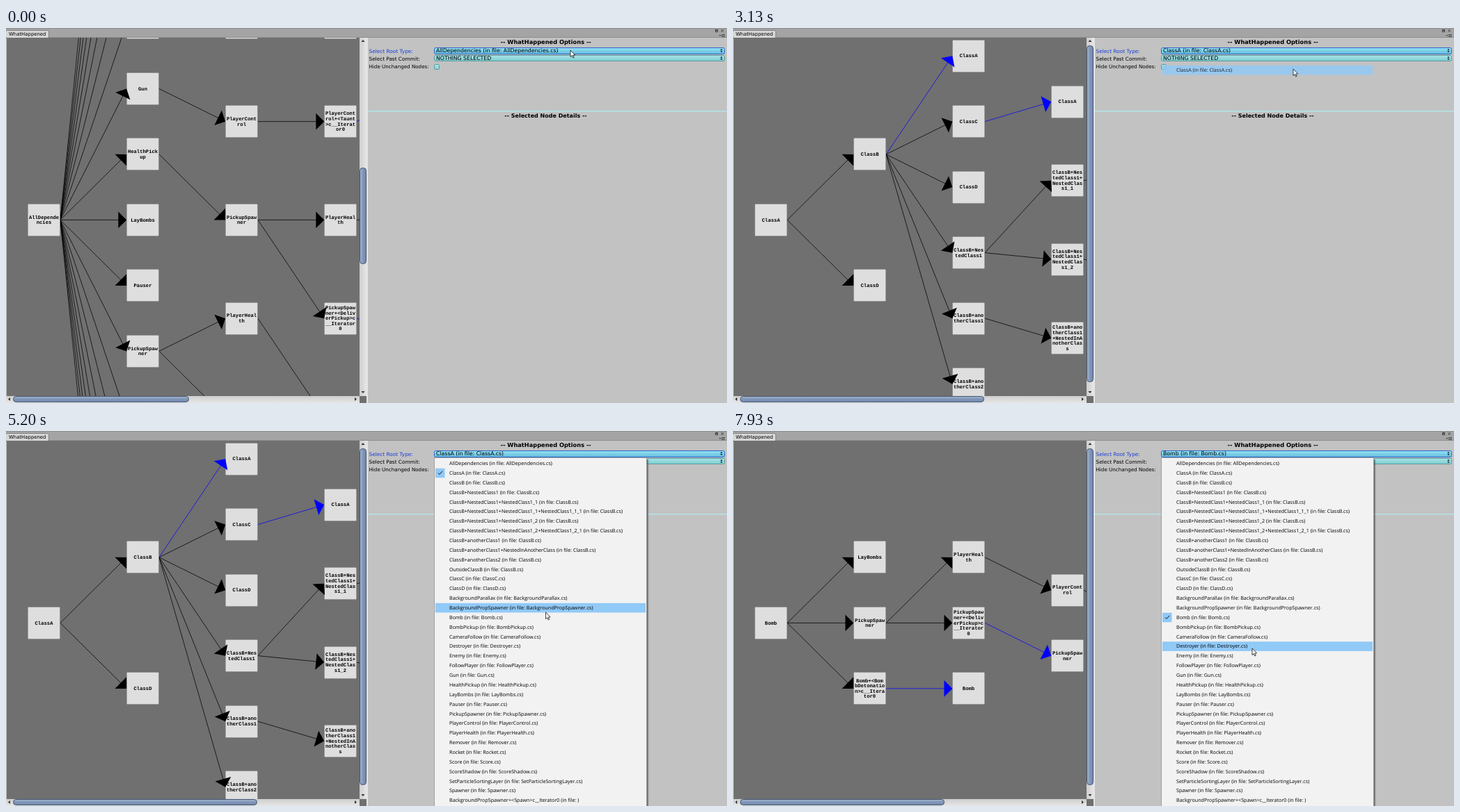
Write an HTML page with a canvas that moves like this. It is 1036x540 px and loops after 8000 ms.

```html
<!DOCTYPE html>
<html lang="en">
<head>
<meta charset="utf-8">
<title>WhatHappened</title>
<style>
html, body { margin: 0; width: 100%; height: 100%; overflow: hidden; background: #c2c2c2; }
canvas { display: block; }
</style>
</head>
<body>
<canvas id="stage" width="1036" height="540"></canvas>
<script>
const ctx = document.getElementById('stage').getContext('2d');
const UI = '"DejaVu Sans", sans-serif';
const MENU = '"Open Sans", "Noto Sans", sans-serif';
const MONO = '"Liberation Mono", monospace';
const LOOP = 8000, STEP = 200 / 3;
const ROW = 13.863, ROW0 = 46.6;

// node: column, row, label, parent index, back reference
const fan = [];
for (let r = 3; r <= 10; r++) fan.push([1, -r, '', 0], [1, r, '', 0]);
const graphs = [
  { title: 'AllDependencies', thumbY: [201, 340], thumbX: 263, nodes: [
    [0, 0, 'AllDependencies', -1],
    [1, -2, 'Gun', 0],
    [1, -1, 'HealthPickup', 0],
    [1, 0, 'LayBombs', 0],
    [1, 1, 'Pauser', 0],
    [1, 2, 'PickupSpawner', 0],
    [2, -1.5, 'PlayerControl', 1],
    [2, 0, 'PickupSpawner', 2],
    [2, 1.5, 'PlayerHealth', 5],
    [3, -1.5, 'PlayerControl+<Taunt>c__Iterator0', 6],
    [3, 0, 'PlayerHealth', 7],
    [3, 1.5, 'PickupSpawner+<DeliverPickup>c__Iterator0', 7],
    [2, 3, '', 5], [3, 3, '', 8],
    [4, -2, '', 9, 1], [4, 0, '', 10], [4, 1.75, '', 11, 1],
    [2, -3, '', -1], [3, -3, '', -1],
    ...fan
  ] },
  { title: 'ClassA', thumbY: [25, 510], thumbX: 361, nodes: [
    [0, 0, 'ClassA', -1],
    [1, -1, 'ClassB', 0],
    [1, 1, 'ClassD', 0],
    [2, -2.5, 'ClassA', 1, 1],
    [2, -1.5, 'ClassC', 1],
    [2, -0.5, 'ClassD', 1],
    [2, 0.5, 'ClassB+NestedClass1', 1],
    [2, 1.5, 'ClassB+anotherClass1', 1],
    [2, 2.5, 'ClassB+anotherClass2', 1],
    [3, -1.8, 'ClassA', 4, 1],
    [3, -0.6, 'ClassB+NestedClass1+NestedClass1_1', 6],
    [3, 0.6, 'ClassB+NestedClass1+NestedClass1_2', 6],
    [3, 1.8, 'ClassB+anotherClass1+NestedInAnotherClass', 7],
    [4, -0.8, '', 10], [4, 0.8, '', 11]
  ] },
  { title: 'Bomb', thumbY: [25, 510], thumbX: 304, nodes: [
    [0, 0, 'Bomb', -1],
    [1, -1, 'LayBombs', 0],
    [1, 0, 'PickupSpawner', 0],
    [1, 1, 'Bomb+<Bom|bDetonation>c__Iterator0', 0],
    [2, -1, 'PlayerHealth', 2],
    [2, 0, 'PickupSpawner+<DeliverPickup>c__Iterator0', 2],
    [2, 1, 'Bomb', 3, 1],
    [3, -0.5, 'PlayerControl', 4],
    [3, 0.5, 'PickupSpawner', 5, 1],
    [4, 0, '', 7]
  ] }
];

const inFile = (type, file = type) => `${type} (in file: ${file}.cs)`;
const inB = type => inFile(type, 'ClassB');
const items = [
  ...['AllDependencies', 'ClassA', 'ClassB'].map(s => inFile(s)),
  ...['ClassB+NestedClass1', 'ClassB+NestedClass1+NestedClass1_1',
    'ClassB+NestedClass1+NestedClass1_1+NestedClass1_1_1',
    'ClassB+NestedClass1+NestedClass1_2',
    'ClassB+NestedClass1+NestedClass1_2+NestedClass1_2_1',
    'ClassB+anotherClass1', 'ClassB+anotherClass1+NestedInAnotherClass',
    'ClassB+anotherClass2', 'OutsideClassB'].map(inB),
  ...('ClassC ClassD BackgroundParallax BackgroundPropSpawner Bomb BombPickup CameraFollow ' +
    'Destroyer Enemy FollowPlayer Gun HealthPickup LayBombs Pauser PickupSpawner PlayerControl ' +
    'PlayerHealth Remover Rocket Score ScoreShadow SetParticleSortingLayer Spawner')
    .split(' ').map(s => inFile(s)),
  'BackgroundPropSpawner+<Spawn>c__Iterator0 (in file: )'
];

// times below are in steps of 1/15 s
const menus = [[22, 46, 0], [65, 89, 1], [110, 120, 16]];   // open, close, checked row
const picks = [[46, 1], [88, 16]];                          // start of fade, row
const path = [                                              // step, x, y of the pointer
  [0, 811, 32], [15, 811, 32], [16, 810.5, 32], [27, 810.5, 32], [30, 808, 47], [33, 805, 59],
  [47, 805, 59], [52, 803, 29], [54, 803, 29], [56, 803, 32], [57, 803, 32], [58, 802.5, 32.5],
  [66, 802.5, 32.5], [67, 802, 42], [71, 794, 138], [75, 781, 230], [77, 776, 255], [79, 775, 267],
  [89, 775, 267], [92, 774, 240], [97, 771, 90], [101, 770, 36], [105, 773, 32],
  [114, 773, 32], [115, 771, 42], [117, 760, 165], [119, 746, 313], [120, 746, 313]
];

function pointerAt(n) {
  const i = path.findIndex(k => k[0] > n);
  const [a, x, y] = path[i - 1], [b, x2, y2] = path[i];
  const u = (n - a) / (b - a);
  return [x + (x2 - x) * u, y + (y2 - y) * u];
}

function box(x, y, w, h, fill, stroke) {
  ctx.fillStyle = fill;
  ctx.fillRect(x, y, w, h);
  if (stroke) {
    ctx.strokeStyle = stroke;
    ctx.lineWidth = 1;
    ctx.strokeRect(x + 0.5, y + 0.5, w - 1, h - 1);
  }
}

function pill(x, y, w, h, r, fill, stroke) {
  ctx.beginPath();
  ctx.roundRect(x + 0.5, y + 0.5, w - 1, h - 1, r);
  ctx.fillStyle = fill;
  ctx.fill();
  ctx.strokeStyle = stroke;
  ctx.lineWidth = 1;
  ctx.stroke();
}

function poly(points, fill) {
  ctx.beginPath();
  points.forEach(p => ctx.lineTo(p[0], p[1]));
  ctx.closePath();
  ctx.fillStyle = fill;
  ctx.fill();
}

function text(s, x, y, font, color = '#000', align = 'left') {
  ctx.font = font;
  ctx.fillStyle = color;
  ctx.textAlign = align;
  ctx.fillText(s, x, y);
}

function ramp(x, y, x2, y2, ...colors) {
  const g = ctx.createLinearGradient(x, y, x2, y2);
  colors.forEach((c, i) => g.addColorStop(i / (colors.length - 1), c));
  return g;
}

function drawGraph(g) {
  const at = node => [54.5 + 142 * node[0], 276.4 + 94.5 * node[1]];
  const color = node => node[4] ? '#00f' : '#000';
  const links = g.nodes.filter(node => node[3] >= 0).map(node => {
    const [ax, ay] = at(g.nodes[node[3]]), [bx, by] = at(node);
    return [ax + 23.5, ay, bx - 23.3, by, color(node)];
  });
  ctx.save();
  ctx.beginPath();
  ctx.rect(1, 14, 507, 516);
  ctx.clip();
  box(0, 14, 508, 516, '#707070');
  ctx.lineWidth = 0.75;
  for (const [ax, ay, bx, by, c] of links) {
    ctx.strokeStyle = c;
    ctx.beginPath();
    ctx.moveTo(ax, ay);
    ctx.lineTo(bx, by);
    ctx.stroke();
  }
  for (const node of g.nodes) {
    const [x, y] = at(node);
    const left = Math.round(x - 23.5), top = Math.round(y - 23.5);
    box(left, top, 47, 47, '#555');
    box(left + 0.5, top + 0.5, 46, 46, '#dedede');
  }
  for (const [ax, ay, bx, by, c] of links) {
    const d = Math.hypot(bx - ax, by - ay);
    const u = 11.8 * (bx - ax) / d, v = 11.8 * (by - ay) / d;
    poly([[bx, by], [bx - u - v, by - v + u], [bx - u + v, by - v - u]], c);
  }
  for (const node of g.nodes) {
    if (!node[2]) continue;
    const [x, y] = at(node);
    const lines = node[2].split('|').flatMap(s => s.match(/.{1,10}/g));
    lines.forEach((s, i) =>
      text(s, x, y + 2.1 + 7.6 * (i - (lines.length - 1) / 2), `bold 7.2px ${MONO}`, '#000', 'center'));
  }
  ctx.restore();
}

function drawScrollbars(g) {
  const blues = ['#a9b9d3', '#8095b8', '#6f86ab'], edge = '#46566f';
  box(508, 14, 10, 516, ramp(508, 0, 518, 0, '#cecece', '#e6e6e6'));
  box(0, 530, 508, 10, ramp(0, 530, 0, 540, '#cecece', '#e6e6e6'));
  box(508, 530, 10, 10, '#707070');
  const [top, end] = g.thumbY;
  pill(508, top, 10, end - top, 4, ramp(508, 0, 518, 0, ...blues), edge);
  pill(10, 530, g.thumbX - 10, 9, 4, ramp(0, 530, 0, 539, ...blues), edge);
  poly([[513, 17], [515.5, 20], [510.5, 20]], '#333');
  poly([[513, 526], [515.5, 523], [510.5, 523]], '#333');
  poly([[3, 534.5], [6, 532], [6, 537]], '#333');
  poly([[504, 534.5], [501, 532], [501, 537]], '#333');
  box(518, 14, 2, 526, '#e4e4e4');
}

function drawPopup(y, label, focused) {
  const fill = focused ? ramp(0, y, 0, y + 10, '#9be4f4', '#7acfe8', '#62b8dc')
    : ramp(0, y, 0, y + 9, '#b2eaec', '#90d8db', '#7ccbcf');
  pill(615, y, 418, focused ? 10 : 9, 2, fill, focused ? '#2c66c4' : '#5c999d');
  text(label, 618, y + 7.4, `7.78px ${UI}`);
  const m = y + 4.5;
  poly([[1028, m - 2.7], [1029.6, m - 0.5], [1026.4, m - 0.5]], '#123');
  poly([[1028, m + 2.7], [1029.6, m + 0.5], [1026.4, m + 0.5]], '#123');
}

function drawPanel(g) {
  box(520, 14, 516, 526, '#c2c2c2');
  text('-- WhatHappened Options --', 775.7, 23.3, `bold 8.25px ${UI}`, '#000', 'center');
  text('Select Root Type:', 521.5, 35.6, `7.35px ${UI}`, '#1a3fd8');
  text('Select Past Commit:', 521.5, 46.8, `7.3px ${UI}`);
  text('Hide Unchanged Nodes:', 521.5, 58.3, `7.15px ${UI}`);
  drawPopup(28, inFile(g.title), true);
  drawPopup(39, 'NOTHING SELECTED', false);
  pill(615, 52, 8, 8, 1, ramp(0, 52, 0, 60, '#b2eaec', '#86cdd1'), '#5c999d');
  box(520, 119, 516, 1.5, '#b4e6e8');
  text('-- Selected Node Details --', 775.5, 128.7, `bold 8px ${UI}`, '#000', 'center');
}

function drawFrame() {
  box(0, 0, 1036, 14, '#a4a4a4');
  box(0, 0, 1036, 1, '#8c8c8c');
  box(0, 13, 1036, 1, '#8e8e8e');
  pill(-1, 3, 63, 12, 2, '#d6d6d6', '#828282');
  text('WhatHappened', 4, 11.4, `6.9px ${UI}`);
  box(1019, 2, 4, 4, '#a4a4a4', '#444');
  box(1019, 2, 4, 2, '#444');
  ctx.strokeStyle = '#444';
  ctx.lineWidth = 0.9;
  ctx.beginPath();
  ctx.moveTo(1027.5, 2); ctx.lineTo(1031, 5.8);
  ctx.moveTo(1031, 2); ctx.lineTo(1027.5, 5.8);
  ctx.stroke();
  poly([[1024.5, 10], [1027.5, 10], [1026, 12]], '#444');
  for (let i = 0; i < 3; i++) box(1028, 9 + i * 1.5, 5, 0.8, '#444');
}

function drawItem(i, lit) {
  const y = ROW0 + ROW * i;
  if (lit) box(617, y - 6.7, 302, 13.6, '#91c9f7');
  text(items[i], 637, y + 2.5, `7.16px ${MENU}`);
}

function drawMenu(alpha, checked, hover) {
  ctx.save();
  ctx.globalAlpha = alpha;
  box(921, 41, 3, 499, ramp(921, 0, 924, 0, 'rgba(0,0,0,.55)', 'rgba(0,0,0,0)'));
  box(615, 38, 306, 503, '#f2f2f2', '#a0a0a0');
  items.forEach((_, i) => drawItem(i, i === hover));
  const y = ROW0 + ROW * checked;
  box(617, y - 6.7, 13.5, 13.6, '#91c9f7');
  ctx.strokeStyle = '#111';
  ctx.lineWidth = 1;
  ctx.beginPath();
  ctx.moveTo(621, y); ctx.lineTo(623, y + 2); ctx.lineTo(627, y - 2.5);
  ctx.stroke();
  ctx.restore();
}

function drawPointer(x, y) {
  const shape = [[0, 0], [0, 9.6], [2.2, 7.6], [3.7, 11], [5.2, 10.3], [3.7, 7.1], [6.6, 6.9]];
  poly(shape.map(p => [x + p[0], y + p[1]]), '#fff');
  ctx.strokeStyle = '#111';
  ctx.lineWidth = 0.8;
  ctx.stroke();
}

function draw(t) {
  const n = Math.min(119, Math.floor((t % LOOP + 4) / STEP));
  const g = graphs[n < 47 ? 0 : n < 89 ? 1 : 2];
  const [x, y] = pointerAt(n);
  ctx.textRendering = 'geometricPrecision';
  drawFrame();
  drawGraph(g);
  drawScrollbars(g);
  drawPanel(g);
  for (const [start, row] of picks) {
    const alpha = 1 - (n - start) / 6;
    if (n < start || alpha <= 0) continue;
    ctx.globalAlpha = alpha;
    drawItem(row, true);
    ctx.globalAlpha = 1;
  }
  for (const [open, close, checked] of menus) {
    if (n < open || n >= close) continue;
    const hover = Math.floor((y - 3 - ROW0) / ROW + 0.5);
    drawMenu(Math.min(1, (n - open + 1) * 0.31), checked, hover);
  }
  drawPointer(x, y);
}

let began;
function tick(now) {
  began ??= now;
  draw(now - began);
  requestAnimationFrame(tick);
}
draw(0);
requestAnimationFrame(tick);
</script>
</body>
</html>
```
